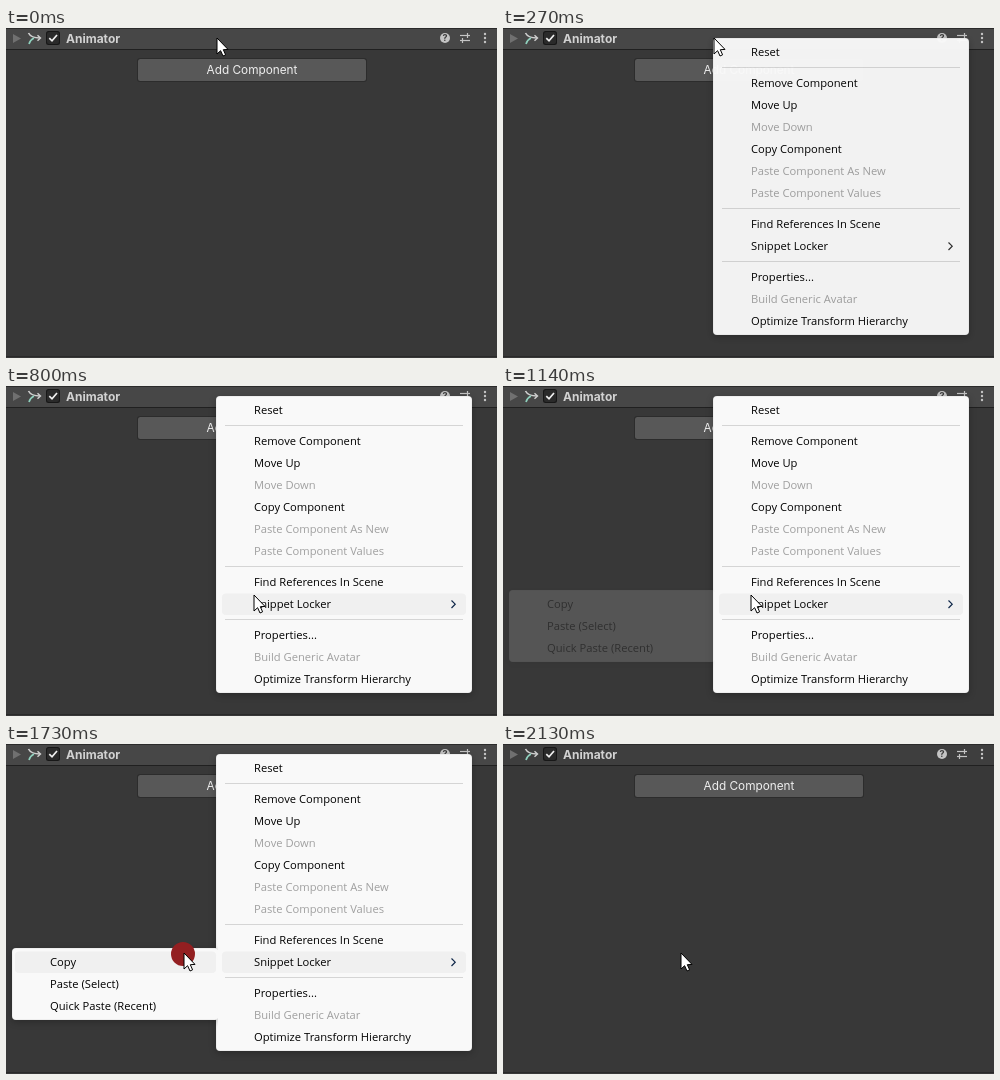
An HTML page with a canvas for the animation above (2.52 s loop, 491x330 px).

```html
<!DOCTYPE html>
<html lang="en">
<head>
<meta charset="utf-8">
<title>Component context menu</title>
<style>
  html, body { margin: 0; width: 100%; height: 100%; overflow: hidden; background: #383838; }
  canvas { display: block; width: 491px; height: 330px; }
</style>
</head>
<body>
<canvas id="stage"></canvas>
<script>
const W = 491, H = 330, LOOP = 2520;
const UI = 'Inter, Roboto, sans-serif';
const MENU = '11.2px "Open Sans", "Noto Sans", sans-serif';
const dpr = window.devicePixelRatio || 1;

const makeContext = canvas => {
  canvas.width = W * dpr;
  canvas.height = H * dpr;
  const c = canvas.getContext('2d');
  c.scale(dpr, dpr);
  return c;
};
const ctx = makeContext(document.getElementById('stage'));
const layer = makeContext(document.createElement('canvas'));

const TICKS = [0, 140, 200, 270, 340, 400, 470, 530, 600, 670, 730, 800,
  1140, 1200, 1270, 1330, 1400, 1460, 1730, 1790, 1860, 1930, 2000, 2060, 2130];

// time, x, y of the pointer tip
const PATH = [[340, 211, 10], [400, 214, 26], [600, 244, 161], [670, 246, 182],
  [730, 248, 203], [800, 248, 209], [1270, 248, 209], [1330, 222, 198],
  [1400, 190, 204], [1460, 178, 209]];

// label, centre y, disabled
const MAIN = [['Reset', 24], ['Remove Component', 55], ['Move Up', 77],
  ['Move Down', 99, true], ['Copy Component', 121], ['Paste Component As New', 143, true],
  ['Paste Component Values', 165, true], ['Find References In Scene', 196],
  ['Snippet Locker', 218], ['Properties...', 249], ['Build Generic Avatar', 271, true],
  ['Optimize Transform Hierarchy', 293]];
const SUB = [['Copy', 218], ['Paste (Select)', 240], ['Quick Paste (Recent)', 262]];

function pointer(t) {
  if (t <= PATH[0][0]) return PATH[0].slice(1);
  for (let i = 1; i < PATH.length; i++) {
    const [t0, x0, y0] = PATH[i - 1], [t1, x1, y1] = PATH[i];
    if (t <= t1) {
      const u = (t - t0) / (t1 - t0);
      return [x0 + (x1 - x0) * u, y0 + (y1 - y0) * u];
    }
  }
  return PATH[PATH.length - 1].slice(1);
}

const fadeIn = (age, duration) =>
  age < 0 ? 0 : Math.min(1, 0.15 + 0.85 * age / duration);

function box(c, x, y, w, h, r, fill) {
  c.beginPath();
  c.roundRect(x, y, w, h, r);
  c.fillStyle = fill;
  c.fill();
}

function line(c, pts, color, width = 1) {
  c.beginPath();
  pts.forEach(([x, y]) => c.lineTo(x, y));
  c.strokeStyle = color;
  c.lineWidth = width;
  c.stroke();
}

function disc(x, y, r, fill) {
  ctx.beginPath();
  ctx.arc(x, y, r, 0, Math.PI * 2);
  ctx.fillStyle = fill;
  ctx.fill();
}

function text(c, str, x, y, font, fill, align = 'left') {
  c.font = font;
  c.fillStyle = fill;
  c.textAlign = align;
  c.fillText(str, x, y);
}

function animatorIcon() {
  ctx.lineWidth = 1.6;
  ctx.strokeStyle = '#d0d0d0';
  ctx.beginPath();
  ctx.moveTo(22.5, 5);
  ctx.quadraticCurveTo(25, 10, 34, 10);
  ctx.stroke();
  ctx.strokeStyle = '#8fd0bd';
  ctx.beginPath();
  ctx.moveTo(23, 16);
  ctx.quadraticCurveTo(24, 12, 28, 10);
  ctx.stroke();
  line(ctx, [[31.5, 7.2], [34.5, 10], [31.5, 12.8]], '#d0d0d0', 1.4);
}

function headerIcons() {
  disc(439, 10, 5, '#c4c4c4');
  text(ctx, '?', 439, 13.3, `bold 9px ${UI}`, '#3a3a3a', 'center');
  line(ctx, [[454, 7.5], [464, 7.5]], '#c4c4c4', 1.2);
  line(ctx, [[461.5, 5], [461.5, 10]], '#c4c4c4', 1.2);
  line(ctx, [[454, 12.5], [464, 12.5]], '#c4c4c4', 1.2);
  line(ctx, [[456.5, 10], [456.5, 15]], '#c4c4c4', 1.2);
  for (const y of [6, 10, 14]) disc(479, y, 1.2, '#c4c4c4');
}

function inspector(hover) {
  ctx.fillStyle = '#383838';
  ctx.fillRect(0, 0, W, H);
  ctx.fillStyle = hover ? '#474747' : '#3e3e3e';
  ctx.fillRect(0, 0, W, 21);
  ctx.fillStyle = '#2b2b2b';
  ctx.fillRect(0, 0, W, 1);
  ctx.fillStyle = '#202020';
  ctx.fillRect(0, 21, W, 1);
  ctx.fillStyle = '#2a2a2a';
  ctx.fillRect(0, 328, W, 1);

  ctx.beginPath();
  ctx.moveTo(7, 6);
  ctx.lineTo(15, 10.5);
  ctx.lineTo(7, 15);
  ctx.fillStyle = '#707070';
  ctx.fill();
  animatorIcon();
  box(ctx, 40, 3, 14, 14, 2.5, '#171717');
  box(ctx, 41, 4, 12, 12, 2, '#2a2a2a');
  line(ctx, [[43.3, 10.2], [46, 12.8], [51, 7]], '#f0f0f0', 1.7);
  text(ctx, 'Animator', 60, 15, `700 12px ${UI}`, '#d2d2d2');
  headerIcons();

  box(ctx, 131, 30, 230, 24, 3, '#2c2c2c');
  box(ctx, 132, 31, 228, 22, 2.5, '#585858');
  text(ctx, 'Add Component', 246, 46, `11.8px ${UI}`, '#eeeeee', 'center');
}

function panel(x, y, w, h) {
  layer.save();
  layer.shadowColor = 'rgba(0,0,0,.25)';
  layer.shadowBlur = 7 * dpr;
  layer.shadowOffsetY = 2 * dpr;
  box(layer, x, y, w, h, 4, '#e4e4e4');
  layer.restore();
  box(layer, x + 0.5, y + 0.5, w - 1, h - 1, 4, '#f9f9f9');
}

function rows(items, x, hoverY, rect) {
  for (const [label, y, off] of items) {
    const on = Math.abs(y - hoverY) < 11;
    if (on) box(layer, rect[0], y - 10.5, rect[1], 21.5, 4, '#f0f0f0');
    text(layer, label, x, y + 4, MENU, off ? '#a0a0a0' : '#000');
  }
}

// Draws a group on the layer, then blends it as one.
function blend(alpha, draw) {
  if (alpha <= 0) return;
  layer.clearRect(0, 0, W, H);
  draw();
  ctx.globalAlpha = alpha;
  ctx.drawImage(layer.canvas, 0, 0, W, H);
  ctx.globalAlpha = 1;
}

function mainMenu(hoverY) {
  panel(210, 10, 256, 297);
  for (const y of [39.5, 180.5, 233.5]) line(layer, [[219, y], [457, y]], '#d5d5d5');
  rows(MAIN, 248, hoverY, [216, 244]);
  line(layer, [[445.5, 214.5], [449.2, 218.2], [445.5, 222]],
    Math.abs(hoverY - 218) < 11 ? '#10284a' : '#303030', 1.2);
}

// The submenu casts no shadow on its parent menu.
function subMenu(hoverY) {
  layer.save();
  layer.beginPath();
  layer.rect(0, 0, 212, H);
  layer.clip();
  panel(6, 204, 207, 72);
  layer.restore();
  rows(SUB, 44, hoverY, [9, 201]);
}

function chosenItem() {
  layer.fillStyle = '#f0f0f0';
  layer.fillRect(9, 207, 201, 22);
  text(layer, 'Copy', 44, 222, MENU, '#000');
}

function cursor(x, y) {
  ctx.save();
  ctx.translate(x, y);
  ctx.beginPath();
  [[0, 0], [0, 16], [3.6, 12.7], [6, 18], [8.6, 16.8], [6.3, 11.7], [11, 11.4]]
    .forEach(([px, py]) => ctx.lineTo(px, py));
  ctx.closePath();
  ctx.fillStyle = '#fff';
  ctx.fill();
  ctx.strokeStyle = '#000';
  ctx.lineWidth = 1;
  ctx.stroke();
  ctx.restore();
}

function render(time) {
  const t = TICKS.filter(k => k <= time).pop();
  const [x, y] = pointer(t);
  inspector(t < 1790);
  if (t < 1790) {
    const hoverY = t < 400 ? -99 : t < 800 ? y : 218;
    blend(fadeIn(t - 140, 135), () => mainMenu(hoverY));
    blend(fadeIn(t - 1140, 120), () => subMenu(t >= 1400 ? y : -99));
  } else {
    blend(0.8 * (2130 - t) / 340, chosenItem);
  }
  if (t === 140 || t === 1730) disc(x - 1, y + 1, 12, '#931f21');
  cursor(x, y);
}

const start = performance.now();
function frame() {
  render((performance.now() - start) % LOOP);
  requestAnimationFrame(frame);
}
frame();
</script>
</body>
</html>
```
